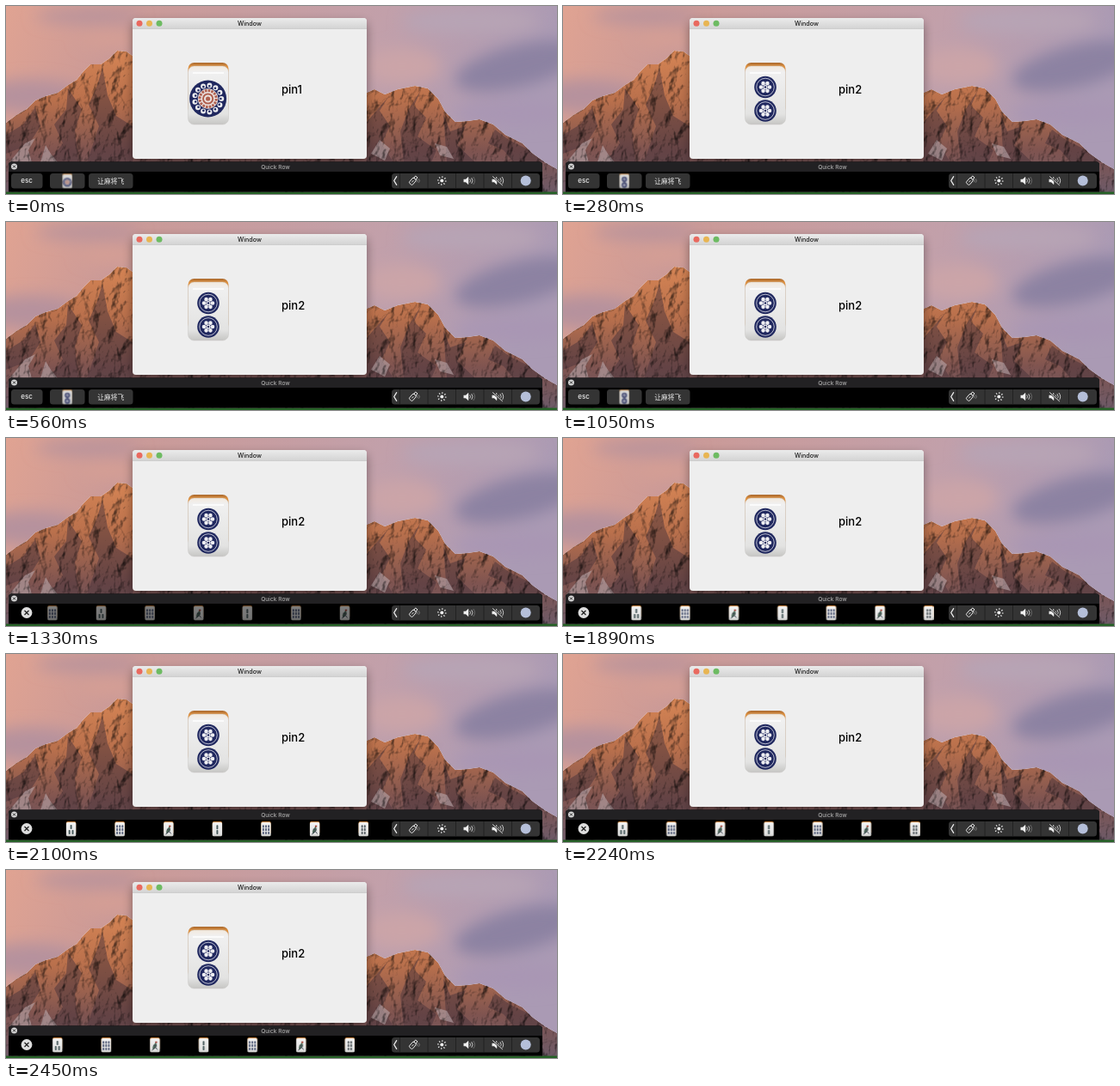
Animation of 640 by 219 pixels, one loop 2.52 s. Source, as an HTML page:

```html
<!DOCTYPE html>
<html lang="en">
<head>
<meta charset="utf-8">
<title>Tile picker</title>
<style>
  html, body { margin: 0; width: 100%; height: 100%; overflow: hidden; background: #000; }
  svg { display: block; width: 100vw; height: 100vh; }
  text { font-family: Inter, "Noto Sans CJK SC", "Noto Sans CJK", sans-serif; font-weight: 500; text-anchor: middle; }
  .label { font-size: 13px; font-weight: 450; text-anchor: start; }

  .one, .two { animation: one 2520ms step-end infinite; }
  .two { animation-name: two; }
  .menu { animation: menu 2520ms linear infinite; }
  .cancel { animation: cancel 2520ms linear infinite; }
  .tiles { animation: tiles 2520ms linear infinite; }
  .scroll { animation: scroll 2520ms steps(36) infinite; }

  @keyframes one { 0% { opacity: 1 } 11.11%, 100% { opacity: 0 } }
  @keyframes two { 0% { opacity: 0 } 11.11%, 100% { opacity: 1 } }
  @keyframes menu { 0%, 45% { opacity: 1 } 51%, 100% { opacity: 0 } }
  @keyframes cancel { 0%, 47.2% { opacity: 0 } 52%, 100% { opacity: 1 } }
  @keyframes tiles { 0%, 47.2% { opacity: 0 } 58%, 100% { opacity: 1 } }
  @keyframes scroll { from { transform: translateX(114px) } to { transform: translateX(0) } }
</style>
</head>
<body>
<svg viewBox="0 0 640 219" preserveAspectRatio="none">
  <defs>
    <linearGradient id="sky" x2="1" y2=".15">
      <stop stop-color="#e0a392"/><stop offset=".22" stop-color="#cb9a97"/>
      <stop offset=".68" stop-color="#c2a0aa"/><stop offset="1" stop-color="#aa9ab4"/>
    </linearGradient>
    <linearGradient id="stone" x2="0" y2="1">
      <stop stop-color="#d58454"/><stop offset=".35" stop-color="#b9704c"/>
      <stop offset=".7" stop-color="#7f5450"/><stop offset="1" stop-color="#6d5a68"/>
    </linearGradient>
    <linearGradient id="bar" x2="0" y2="1">
      <stop stop-color="#ebebeb"/><stop offset="1" stop-color="#d3d3d3"/>
    </linearGradient>
    <linearGradient id="back" x2="0" y2="1">
      <stop stop-color="#a8672c"/><stop offset=".07" stop-color="#dc9143"/><stop offset="1" stop-color="#d08a45"/>
    </linearGradient>
    <linearGradient id="face" x2="0" y2="1">
      <stop stop-color="#f3e9dd"/><stop offset=".1" stop-color="#f0f0f0"/>
      <stop offset=".82" stop-color="#e3e3e2"/><stop offset="1" stop-color="#c6c6c4"/>
    </linearGradient>
    <filter id="soft" x="-50%" y="-50%" width="200%" height="200%"><feGaussianBlur stdDeviation="9"/></filter>
    <filter id="shade" x="-20%" y="-20%" width="140%" height="140%"><feGaussianBlur stdDeviation="6"/></filter>
    <filter id="rock" x="0" y="0" width="100%" height="100%" color-interpolation-filters="sRGB">
      <feTurbulence type="fractalNoise" baseFrequency=".07 .05" numOctaves="4" seed="3"/>
      <feDiffuseLighting surfaceScale="4.5" diffuseConstant="1.2" lighting-color="#fff">
        <feDistantLight azimuth="215" elevation="58"/>
      </feDiffuseLighting>
      <feBlend mode="multiply" in2="SourceGraphic"/>
      <feComposite in2="SourceAlpha" operator="in"/>
    </filter>
    <clipPath id="strip"><rect x="48" y="193" width="390" height="23"/></clipPath>

    <g id="blank">
      <rect x="-23.500" y="-36" width="47" height="60" rx="7" fill="url(#back)"/>
      <rect x="-23.500" y="-32" width="47" height="68" rx="7" fill="url(#face)" stroke="#c9c7c4" stroke-width=".5"/>
      <path d="M-18-24H18" stroke="#fff" stroke-width="1.600"/>
    </g>
    <g id="wheel" fill="none">
      <circle r="12.800" fill="#20285f"/>
      <circle r="10.300" stroke="#dfe0ea" stroke-width=".8"/>
      <circle r="5" stroke="#eeeef2" stroke-width="4.600" stroke-linecap="round" pathLength="6" stroke-dasharray="0 1"/>
      <circle r="2.600" fill="#eeeef2"/><circle r="1.300" fill="#20285f"/>
    </g>
    <g id="pin1" fill="none">
      <use href="#blank"/>
      <g transform="translate(-.4 6)">
        <circle r="21.500" fill="#20285f"/>
        <circle r="15.600" stroke="#ebebee" stroke-width="6" stroke-linecap="round" pathLength="13" stroke-dasharray="0 1"/>
        <circle r="14.800" stroke="#20285f" stroke-width="2.600" stroke-linecap="round" pathLength="13" stroke-dasharray="0 1"/>
        <circle r="11.800" fill="#ebe3e1"/>
        <circle r="9.600" stroke="#b0604f" stroke-width="3" pathLength="32" stroke-dasharray="1.4 .6"/>
        <circle r="5.600" stroke="#b0604f" stroke-width="2"/>
        <circle r="2.600" fill="#b0604f"/>
      </g>
    </g>
    <g id="pin2">
      <use href="#blank"/>
      <use href="#wheel" y="-7.500"/><use href="#wheel" y="20"/>
    </g>
    <g id="bird">
      <path d="M-10 25Q-14 6-2-4Q2-14 10-14L6-8Q14 6 2 16Z" fill="#4c6657"/>
      <path d="M-14 26L4 12L12 24M-8 2L8 6" fill="none" stroke="#444c58" stroke-width="4"/>
      <circle cx="6" cy="-13" r="5" fill="#a94b40"/>
    </g>
  </defs>

  <rect width="640" height="219" fill="url(#sky)"/>
  <g filter="url(#soft)">
    <ellipse cx="95" cy="12" rx="60" ry="9" fill="#b8939b"/>
    <ellipse cx="30" cy="105" rx="60" ry="20" fill="#b6929d"/>
    <ellipse cx="120" cy="38" rx="35" ry="10" fill="#d59f94"/>
    <ellipse cx="460" cy="70" rx="45" ry="22" fill="#cba4a8"/>
    <ellipse cx="540" cy="18" rx="80" ry="14" fill="#b7a4b5"/>
    <ellipse cx="595" cy="70" rx="75" ry="24" fill="#8c82a2" transform="rotate(-14 595 70)"/>
    <ellipse cx="590" cy="125" rx="70" ry="14" fill="#a996b4"/>
  </g>
  <g filter="url(#rock)">
    <path fill="url(#stone)" d="M0 136L12 127 24 120 34 110 46 105 60 101 72 92 82 86 90 76 98 68 110 68 120 61 129 52 140 53 147 58 180 90 250 130 380 130 419 101 428 97 440 103 455 97 475 93 490 96 502 108 510 123 522 135 536 134 550 132 566 138 580 150 600 160 612 172 626 182 640 190V219H0Z"/>
    <g fill="#4a343b" opacity=".5">
      <path d="M0 150L20 138 34 118 40 140 26 162 0 172Z"/>
      <path d="M72 96L70 120 56 138 66 160 50 182H84L80 145 88 120Z"/>
      <path d="M112 72L106 92 96 115 108 140 94 182H147V140L128 128 118 104Z"/>
      <path d="M444 106L434 122 446 140 436 160 450 182H419V135Z"/>
      <path d="M482 98L474 116 488 130 478 152 500 168 494 182H462L458 146 468 120Z"/>
      <path d="M508 126L516 146 534 140 524 162 545 182H512Z"/>
      <path d="M568 144L560 160 578 168 590 182H626L604 166 584 156Z"/>
    </g>
    <g fill="#b9a7aa" opacity=".6">
      <path d="M4 182L22 160 34 154 26 168 30 182Z"/>
      <path d="M40 182L46 162 52 172 60 182Z"/>
      <path d="M424 172L434 156 446 166 440 180Z"/>
      <path d="M498 160L512 164 520 178 504 174Z"/>
    </g>
  </g>

  <rect x="147" y="19" width="272" height="163" rx="5" opacity=".38" filter="url(#shade)"/>
  <rect x="147" y="14" width="272" height="164" rx="4" fill="#eee"/>
  <path d="M147 26.500V18Q147 14 151 14H415Q419 14 419 18V26.500Z" fill="url(#bar)"/>
  <path d="M147 26.500H419" stroke="#c2c2c2" stroke-width=".6"/>
  <circle cx="155" cy="20.200" r="3.500" fill="#e9695f"/>
  <circle cx="166.500" cy="20.200" r="3.500" fill="#e8b552"/>
  <circle cx="178" cy="20.200" r="3.500" fill="#6dbb62"/>
  <text x="283" y="22.800" font-size="7.200" fill="#1c1c1c">Window</text>
  <text class="label one" x="320" y="101.500">pin1</text>
  <text class="label two" x="320" y="101.500">pin2</text>
  <g transform="translate(235 102)">
    <use class="one" href="#pin1"/><use class="two" href="#pin2"/>
  </g>

  <rect y="216.500" width="640" height="2.500" fill="#256126"/>
  <path d="M3 216.500V185Q3 181.500 6.500 181.500H619.500Q623 181.500 623 185V216.500Z"/>
  <path d="M3 193V185Q3 181.500 6.500 181.500H619.500Q623 181.500 623 185V193Z" fill="#222123"/>
  <circle cx="9.500" cy="187" r="3.500" fill="#d4d4d4"/>
  <path d="M8 185.500l3 3m0-3l-3 3" stroke="#222" stroke-width=".9"/>
  <text x="313" y="189.600" font-size="6.600" fill="#aaa">Quick Row</text>

  <g class="menu">
    <g fill="#343434">
      <rect x="6" y="195" width="36.500" height="17.500" rx="3.500"/>
      <rect x="51" y="195" width="40.500" height="17.500" rx="3.500"/>
      <rect x="96" y="195" width="51.500" height="17.500" rx="3.500"/>
    </g>
    <text x="24" y="206.300" font-size="8" fill="#eee">esc</text>
    <text x="121.700" y="206.600" font-size="7.700" fill="#eee">让麻将飞</text>
    <g transform="translate(71.300 203.700) scale(.24)" opacity=".88">
      <use class="one" href="#pin1"/><use class="two" href="#pin2"/>
    </g>
  </g>

  <g class="cancel">
    <circle cx="24" cy="203.500" r="6.400" fill="#dedede"/>
    <path d="M21.500 201l5 5m0-5l-5 5" stroke="#222" stroke-width="1.300"/>
  </g>
  <g clip-path="url(#strip)"><g class="tiles"><g class="scroll" id="row"></g></g></g>

  <rect x="448" y="195" width="172" height="17.500" rx="3.500" fill="#343434"/>
  <path d="M457.500 195v17.500M490 195v17.500M522.500 195v17.500M555 195v17.500M587.500 195v17.500" stroke="#1d1d1d" stroke-width=".8"/>
  <g fill="none" stroke="#eee" stroke-linecap="round" stroke-linejoin="round">
    <path d="M453.700 198.700l-3 4.800 3 4.800" stroke-width="1.300"/>
    <g transform="translate(473 203.500) rotate(40)" stroke-width=".9">
      <rect x="-2.500" y="-3" width="5" height="8" rx="1.500"/>
      <path d="M-1.500-3v-3h3v3M0 0v2"/>
    </g>
    <path d="M477.500 202q1.500 1.500 0 3M479.500 201.500q2 2 0 4" stroke="#999" stroke-width=".7"/>
    <circle cx="506.300" cy="203.500" r="2" fill="#eee" stroke="none"/>
    <circle cx="506.300" cy="203.500" r="4.400" stroke-width="1.700" stroke-linecap="butt" pathLength="16" stroke-dasharray=".7 1.300"/>
    <path id="horn" d="M532 202h2l3-2.700v8.400l-3-2.700h-2z" fill="#eee" stroke-width=".5"/>
    <path d="M539 201.800q1.300 1.700 0 3.400M541 200.500q2.300 3 0 6" stroke-width=".8"/>
    <path d="M543 199.300q3.200 4.200 0 8.400" stroke="#777" stroke-width=".8"/>
    <use href="#horn" x="33"/>
    <path d="M572.200 201.800q1.300 1.700 0 3.400M574.200 200.500q2.300 3 0 6M576.200 199.300q3.200 4.200 0 8.400" stroke-width=".8"/>
    <path d="M565.500 198.700l11 10" stroke="#343434" stroke-width="2.300"/>
    <path d="M565.500 198.700l11 10" stroke-width=".9"/>
  </g>
  <circle cx="603.700" cy="203.500" r="6" fill="#b5bfd9"/>
</svg>
<script>
  const STEP = 56.6;
  const GREEN = "#46585a";

  const stick = (x, y, h, color) =>
    `<rect x="${x - 4}" y="${y - h / 2}" width="8" height="${h}" rx="3" fill="${color}"/>`;

  // Evenly spaced bamboo sticks on one tile.
  function grid(cols, rows, color) {
    const h = 48 / rows;
    let out = "";
    for (let c = 0; c < cols; c++)
      for (let r = 0; r < rows; r++)
        out += stick((c - (cols - 1) / 2) * 13, 4 + (r - (rows - 1) / 2) * h, h - 3, color);
    return out;
  }

  const nine = grid(3, 3, "#59627c");
  const three = stick(0, -9, 21, GREEN) + stick(-8, 16, 21, GREEN) + stick(8, 16, 21, GREEN);
  const bird = '<use href="#bird"/>';
  const faces = [nine, three, nine, bird, grid(1, 2, GREEN), nine, bird, grid(2, 3, "#575e62")];

  document.getElementById("row").innerHTML = faces.map((face, i) =>
    `<g transform="translate(${i * STEP} 203.700) scale(.24)"><use href="#blank"/>${face}</g>`).join("");
</script>
</body>
</html>
```
